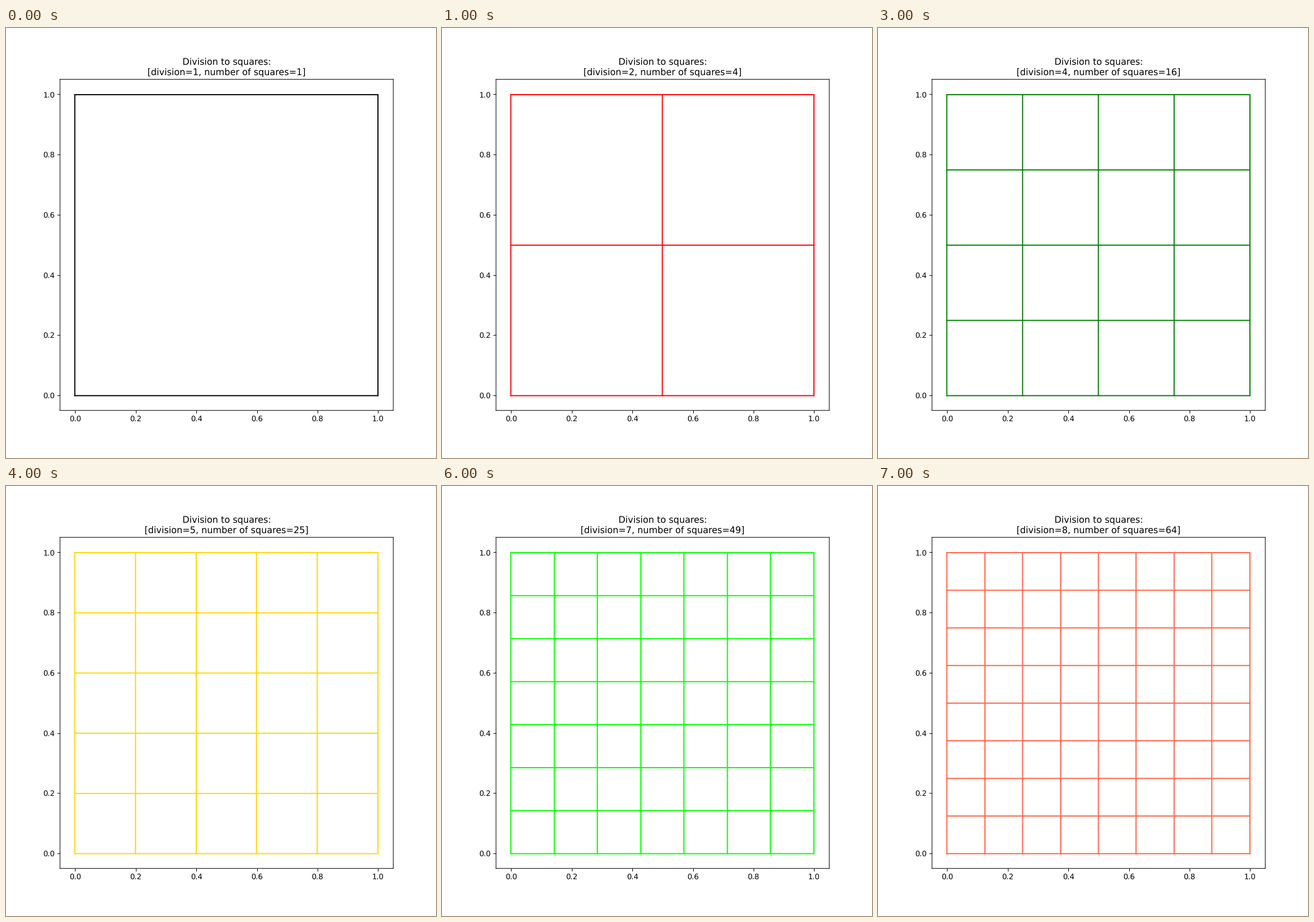
Write a matplotlib script that moves like this. It is 748 px wide and 748 px high and loops after 8 s.

```python
import matplotlib.pyplot as plt
import numpy as np
from matplotlib.animation import FuncAnimation

SIZE, INCHES = 748, 8
GRID = 800  # layout units per side
LEFT, BOTTOM, WIDTH, HEIGHT = 100, 88, 620, 616
LOW, HIGH = -0.05, 1.05
COLORS = ["black", "red", "blue", "green", "gold", "purple", "lime", "tomato"]

plt.rcParams["text.hinting"] = "none"
fig = plt.figure(figsize=(INCHES, INCHES), dpi=SIZE / INCHES)
# Spines run through the centres of the layout units.
ax = fig.add_axes([(LEFT + 0.5) / GRID, (BOTTOM + 0.5) / GRID,
                   WIDTH / GRID, HEIGHT / GRID])


def to_layout(values, start, length):
    """Round data values to whole layout units, returned as data values."""
    scale = length / (HIGH - LOW)
    units = np.floor(start + (values - LOW) * scale + 0.5)
    return (units - start - 0.5) / scale + LOW


def update(step):
    n, color = step + 1, COLORS[step]
    ax.clear()
    ax.set(xlim=(LOW, HIGH), ylim=(LOW, HIGH))
    for spine in ax.spines.values():
        spine.set_snap(False)

    cuts = np.arange(n + 1) / n
    xs = to_layout(cuts, LEFT, WIDTH)
    ys = to_layout(cuts, BOTTOM, HEIGHT)
    for x in xs:
        ax.plot([x, x], ys[[0, -1]], color=color, snap=False)
    for y in ys:
        ax.plot(xs[[0, -1]], [y, y], color=color, snap=False)
    ax.set_title(f"Division to squares:\n[division={n}, number of squares={n * n}]")


anim = FuncAnimation(fig, update, frames=len(COLORS), init_func=lambda: None,
                     interval=1000, repeat=True, repeat_delay=0)
plt.show()
```
